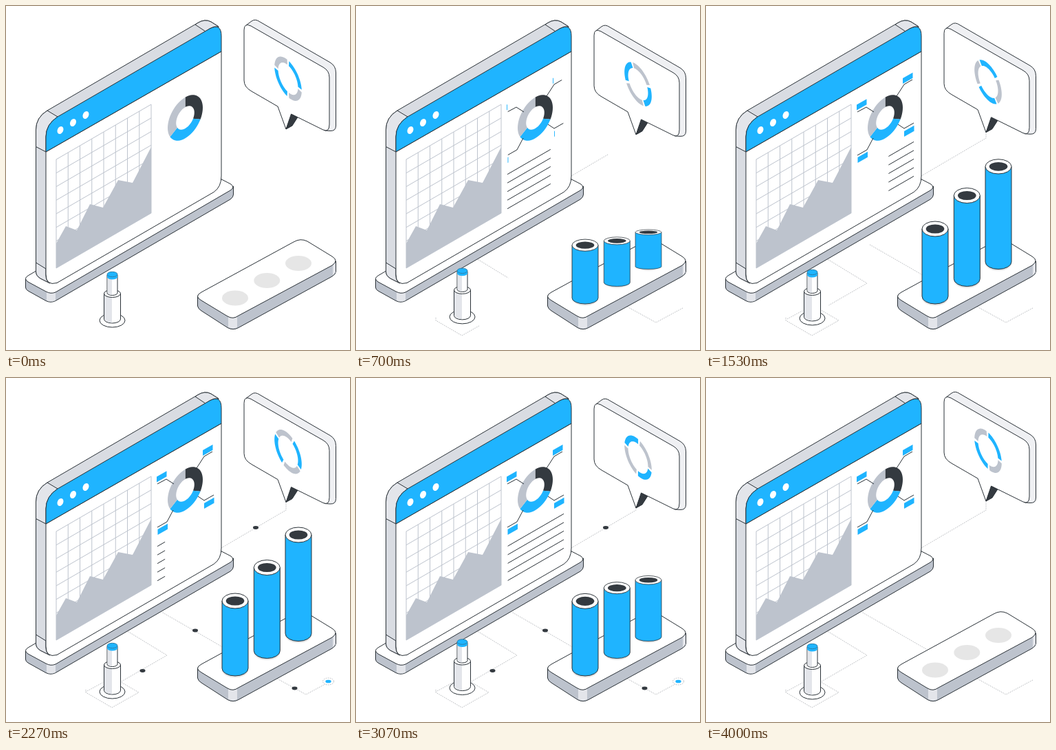
An HTML page for the animation above (4030 ms loop, 500 by 500 pixels).

```html
<!DOCTYPE html>
<html lang="en">
<head>
<meta charset="utf-8">
<title>Isometric dashboard</title>
<style>
html, body { margin: 0; width: 100%; height: 100%; overflow: hidden; background: #fff; }
svg { display: block; width: 100vw; height: 100vh; }
.ink { stroke: #2b3238; stroke-width: 1; stroke-linejoin: round; }
.thin { fill: none; stroke: #2b3238; stroke-width: 1; }
.dots { fill: none; stroke: #b6b9bd; stroke-width: 1; stroke-dasharray: 1.5 1.5; }
.grid { fill: none; stroke: #bdc3cd; stroke-width: 1; }
.blue { fill: #1fb4ff; }
.white { fill: #fff; }
.grey { fill: #bdc3cd; }
.side { fill: #d9dce2; }
.pale { fill: #e3e5ea; }
.dark { fill: #343a40; }
.bare { stroke: none; }
</style>
</head>
<body>
<svg viewBox="0 0 500 500">
  <g id="routes"></g>

  <g class="ink">
    <path class="grey" d="M28.500 397V409Q28.500 412 32 414L58 428.500Q65 432 72 428.500L326 281Q330.500 278 330.500 274V262L70 400Z"/>
    <path class="pale bare" d="M59 415.500Q65 419 72 416V428Q65 431 59 428Z"/>
    <path class="white" d="M32 392L66 372L290 240L327 259Q333 264 326 268L72 416Q65 419 58 415L32 401Q25 396 32 392Z"/>
  </g>
  <g class="ink">
    <path class="side" d="M43.500 386V180Q43.500 162 60 152L278 25Q289 18 298 23L309 30L300 60L75 402H62L50 396Q43.500 392 43.500 386Z"/>
    <path class="pale" d="M43.500 204.500V180Q43.500 162 60 152L75 161Q58 172 58 190V212Z"/>
    <path class="pale" d="M43.500 373V386Q43.500 392 50 396L64 403Q58 400 58 392V382Z"/>
    <path class="pale" d="M275 27L278 25Q289 18 298 23L309 30Q302 29 296 33L290 37Z"/>
    <path class="white" d="M58 212L313 66V247Q313 263 302 270.500L74 402.500Q58 407 58 390Z"/>
    <path class="blue" d="M58 212V190Q58 172 75 161L296 33Q313 24 313 44V66Z"/>
  </g>
  <g id="windowDots" class="white"></g>
  <path id="grid" class="grid"/>
  <path class="grey" d="M73 345L87 320L103 326L122 288L141 293L163 253L184 257L211 205V301L73 381Z"/>
  <g id="donut" transform="translate(260.500 162.500)"></g>
  <path id="textLines" class="thin"/>
  <g id="callouts"></g>

  <g id="bubble">
    <g class="ink">
      <path fill="#eff0f3" d="M349 28L357 22Q362 18 369 23L471 82Q479.500 87 479.500 97V174Q479.500 182 471 181.500L463 181L440 110Z"/>
      <path class="dark" d="M407 179L415 157L424 161.500L416 174Z"/>
      <path class="white" d="M346 108V35Q346 24 356 29L461 89Q470 94 470 104V172Q470 184 461 180L414.500 157L407 179L395 146L357 124Q346 118 346 108Z"/>
    </g>
    <g id="ring" transform="translate(410 105.700)"></g>
  </g>

  <g class="ink">
    <path class="grey" d="M278.500 421V436Q279 440 284 443L322 467.500Q330 472 338 467.500L474 393Q479 390 479.500 386V371L330 440Z"/>
    <path class="pale bare" d="M323 451Q330 455 336 451V467.500Q330 470 323 467Z"/>
    <path class="pale bare" d="M475 377L479 373V387L475 391.500Z"/>
    <path class="white" d="M284 416L418 343Q428 337 438 342L474 364Q484 370 474 377L338 450Q330 456 322 451L284 428Q273 422 284 416Z"/>
  </g>
  <g id="bars"></g>

  <g id="post" class="ink">
    <ellipse class="white" cx="154.500" cy="457" rx="18.500" ry="10"/>
    <path class="white" d="M142.500 418V455A12 6 0 0 0 166.500 455V418Z"/>
    <path class="pale bare" d="M143 419V455Q146 460 154 460.500V419Z"/>
    <ellipse class="white" cx="154.500" cy="418" rx="12" ry="5.500"/>
    <path class="white" d="M147 391V417A7.500 3.500 0 0 0 162 417V391Z"/>
    <path class="pale bare" d="M147.500 394V417Q150 420 154 420V394Z"/>
    <path class="blue bare" d="M147 390V394A7.500 3.500 0 0 0 162 394V390Z"/>
    <ellipse class="blue" cx="154.500" cy="390" rx="7.500" ry="3.700" stroke="#2b7fa8"/>
  </g>
  <g id="nodes"></g>
</svg>
<script>
const LOOP = 4030, HALF = LOOP / 2, QUARTER = LOOP / 4;
const LEAD = 30; // everything rests briefly before it starts to grow
const SLOPE = 0.577;
const $ = id => document.getElementById(id);

function add(parent, tag, attrs) {
  const el = document.createElementNS('http://www.w3.org/2000/svg', tag);
  for (const key in attrs) el.setAttribute(key, attrs[key]);
  return parent.appendChild(el);
}
const progress = (t, from, to) => Math.min(1, Math.max(0, (t - from) / (to - from)));
const smooth = u => u * u * (3 - 2 * u);

// Leading part of a polyline, cut at the given length.
function trim(points, length) {
  if (length <= 0) return '';
  let d = 'M' + points[0];
  for (let i = 1; i < points.length && length > 0; i++) {
    const [x0, y0] = points[i - 1], [x1, y1] = points[i];
    const size = Math.hypot(x1 - x0, y1 - y0), k = Math.min(1, length / size);
    d += `L${x0 + (x1 - x0) * k} ${y0 + (y1 - y0) * k}`;
    length -= size;
  }
  return d;
}
const pathLength = p => p.slice(1).reduce((sum, [x, y], i) => sum + Math.hypot(x - p[i][0], y - p[i][1]), 0);

// Ring sector in an oblique plane: x axis (ax, ay), vertical axis h.
function sector(ax, ay, h, inner, from, to) {
  const steps = 20, points = [];
  const put = (deg, r) => {
    const a = deg * Math.PI / 180, c = Math.cos(a) * r, s = Math.sin(a) * r;
    points.push((c * ax).toFixed(2) + ' ' + (c * ay + s * h).toFixed(2));
  };
  for (let i = 0; i <= steps; i++) put(from + (to - from) * i / steps, 1);
  for (let i = steps; i >= 0; i--) put(from + (to - from) * i / steps, inner);
  return 'M' + points.join('L') + 'Z';
}

// Static details
[[79, 180.5], [97.5, 169.5], [116, 158.5]].forEach(([x, y]) =>
  add($('windowDots'), 'ellipse', { rx: 4.2, ry: 5.7, transform: `translate(${x} ${y}) rotate(25)` }));

let gridPath = '';
for (let i = 0; i <= 8; i++) {
  const x = 73 + i * 17.25, y = 223 - i * 10, row = 223 + i * 19.75;
  gridPath += `M${x} ${y}v158M73 ${row}l138 -80`;
}
$('grid').setAttribute('d', gridPath);

[['dark', -90, 30], ['blue', 30, 150], ['grey', 150, 270]].forEach(([cls, from, to]) =>
  add($('donut'), 'path', { class: cls, d: sector(25.5, -14.7, 29.8, 0.52, from, to) }));

// Dotted routes: points, start time, speed in px/ms
const routes = [
  [[[313, 247], [407, 192], [407, 179]], 190, 0.123],
  [[[175, 367], [234, 403], [168, 441]], 130, 0.095],
  [[[116, 453], [116, 457], [154, 479], [193, 457], [155, 435], [116, 456]], 90, 0.125],
  [[[475, 439], [436, 460], [394, 437]], 50, 0.2],
  [[[320, 394], [226, 340]], 1020, 0.186]
].map(([points, start, speed]) => ({ points, start, speed, el: add($('routes'), 'path', { class: 'dots' }) }));

// Callouts: leader points and the left top corner of the label
const callouts = [
  [[[277, 131], [288, 114], [300, 107]], 286, 105],
  [[[244, 154], [233, 147], [220, 154]], 219, 143.5],
  [[[279, 172], [288, 178], [302, 170]], 288, 182],
  [[[243, 192], [234, 209], [220, 217]], 220.5, 220]
].map(([points, x, y]) => ({
  points, x, y, length: pathLength(points),
  line: add($('callouts'), 'path', { class: 'thin' }),
  label: add($('callouts'), 'path', { class: 'blue' })
}));

const ringParts = [0, 1, 2, 3].map(i => add($('ring'), 'path', { class: i % 2 ? 'blue' : 'grey' }));

// Bars: centre x, foot y, height, growing time
const bars = [[333, 433, 120, 960], [379.3, 407.5, 143, 1340], [425, 382.5, 165.5, 1690]].map(([x, y, h, time]) => {
  add($('bars'), 'ellipse', { cx: x, cy: y - 8.5, rx: 19, ry: 11, fill: '#e6e6e6' });
  const el = add($('bars'), 'g', { class: 'ink' }), top = 11 - h;
  add(el, 'path', { class: 'blue', d: `M-19 ${top}V-11A19 11 0 0 0 19 -11V${top}Z` });
  add(el, 'ellipse', { class: 'white', cy: top, rx: 19, ry: 11 });
  add(el, 'ellipse', { class: 'dark bare', cy: top, rx: 13.3, ry: 6.6 });
  return { x, y, time, el };
});

const nodes = [[363, 217.5], [275, 367], [198.5, 425.5], [419.5, 451], [468.5, 441]].map(([x, y], i) => {
  const el = add($('nodes'), 'g', {});
  if (i < 4) add(el, 'ellipse', { class: 'dark', rx: 4, ry: 2.4 });
  else {
    add(el, 'ellipse', { class: 'white', rx: 8, ry: 5, stroke: '#b6b9bd', 'stroke-dasharray': '1.5 1.5' });
    add(el, 'ellipse', { class: 'blue', rx: 4.2, ry: 2.3 });
  }
  return { x, y, el };
});

function draw(t) {
  const bob = (1 - Math.cos(2 * Math.PI * t / HALF)) / 2;
  $('bubble').setAttribute('transform', `translate(0 ${10 * bob})`);
  $('post').setAttribute('transform', `translate(0 ${-6.5 * bob})`);

  const turn = 360 * t / LOOP;
  ringParts.forEach((el, i) =>
    el.setAttribute('d', sector(19.8, 18, 26.7, 0.73, turn + i * 90 + 4, turn + i * 90 + 86)));

  const mirrored = Math.min(t, LOOP - t);
  bars.forEach(({ x, y, time, el }) => {
    const s = smooth(progress(mirrored, LEAD, LEAD + time));
    el.setAttribute('display', s > 0.004 ? 'inline' : 'none');
    el.setAttribute('transform', `translate(${x} ${y}) scale(1 ${s})`);
  });

  // Text lines are written from the left, then wiped from the left.
  const phase = t % HALF;
  const left = 220 + 82 * smooth(progress(phase, QUARTER, HALF - LEAD));
  const right = 220 + 82 * smooth(progress(phase, LEAD, QUARTER));
  let text = '';
  if (right - left > 0.5) {
    for (let i = 0; i < 5; i++) {
      const y = x => 244.7 + i * 12.5 - (x - 220) * SLOPE;
      text += `M${left} ${y(left)}L${right} ${y(right)}`;
    }
  }
  $('textLines').setAttribute('d', text);

  callouts.forEach(({ points, x, y, length, line, label }) => {
    line.setAttribute('d', trim(points, length * progress(t, LEAD, 720)));
    const w = 14.5 * smooth(progress(t, 650, 980)), rise = w * SLOPE;
    label.setAttribute('d', w ? `M${x} ${y}l${w} ${-rise}v8l${-w} ${rise}Z` : '');
  });

  routes.forEach(({ points, start, speed, el }) =>
    el.setAttribute('d', trim(points, (t - start) * speed)));

  const pop = smooth(progress(t, 1750, 2080)) * (1 - smooth(progress(t, 3500, 3830)));
  nodes.forEach(({ x, y, el }) => {
    el.setAttribute('display', pop > 0 ? 'inline' : 'none');
    el.setAttribute('transform', `translate(${x} ${y}) scale(${pop})`);
  });
}

function frame() {
  draw(performance.now() % LOOP);
  requestAnimationFrame(frame);
}
frame();
</script>
</body>
</html>
```
